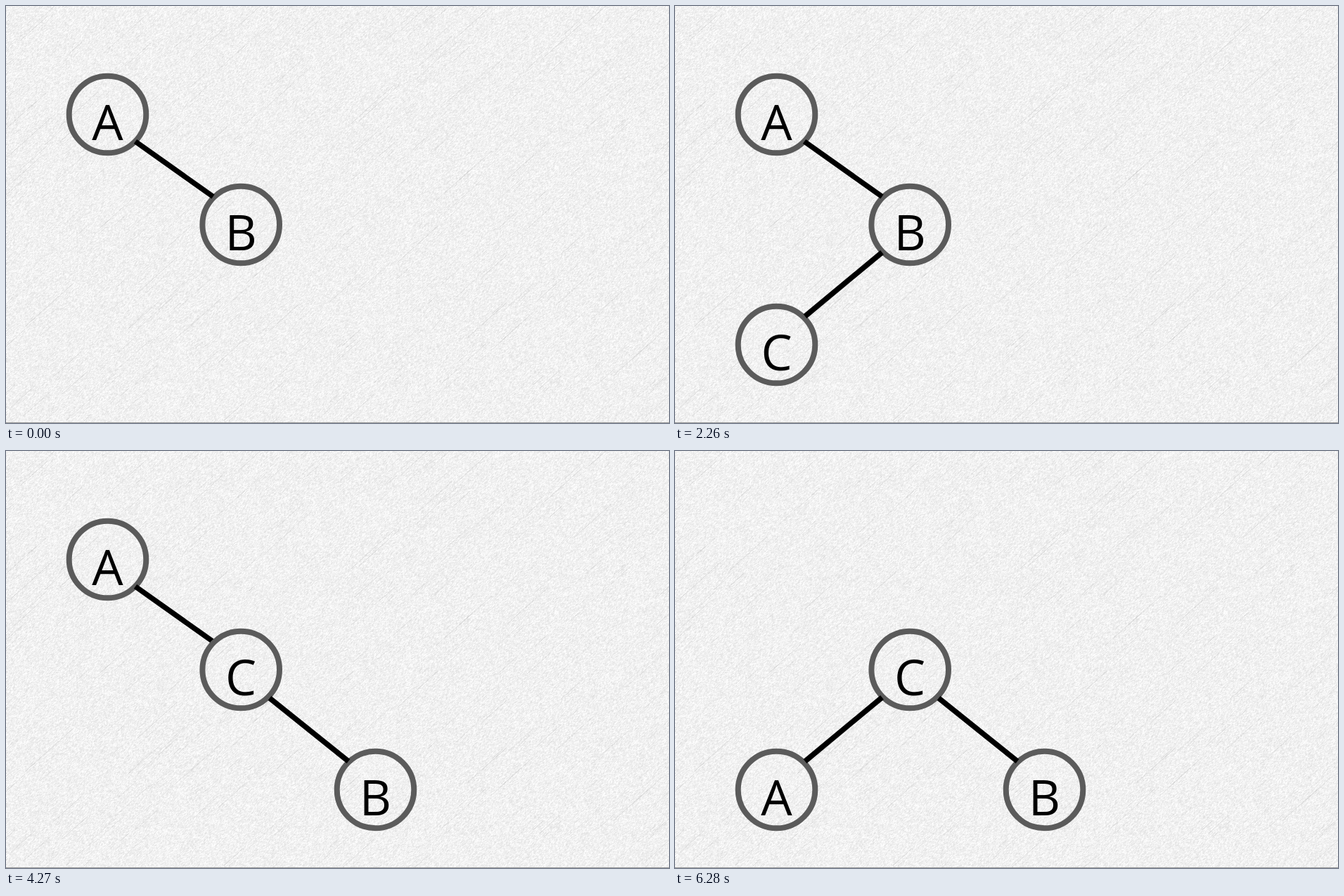
These frames come from a looping animation (943 px wide and 594 px high, 7.18 s). An HTML page with a canvas:

```html
<!DOCTYPE html>
<html lang="en">
<head>
<meta charset="utf-8">
<title>Tree rotation</title>
<style>
  html, body { margin: 0; width: 100%; height: 100%; overflow: hidden; background: #f0f0f0; }
  canvas, svg { position: absolute; left: 0; top: 0; display: block; }
  circle { fill: none; stroke: #5b5b5b; stroke-width: 8; }
  line { stroke: #000; stroke-width: 7.5; }
  text { font: 70px "Open Sans", "Noto Sans", sans-serif; text-anchor: middle; }
</style>
</head>
<body>
<canvas id="paper" width="943" height="594"></canvas>
<svg id="tree" width="943" height="594"></svg>
<script>
const W = 943, H = 594, LOOP = 7180;

let seed = 7;
function random() {
  seed = (seed * 1664525 + 1013904223) >>> 0;
  return seed / 4294967296;
}

// Grainy paper, smeared a little along the rising diagonal, with faint scratches.
function drawPaper() {
  const ctx = document.getElementById('paper').getContext('2d');
  const image = ctx.createImageData(W, H);
  const noise = Float32Array.from({ length: W * H }, random);
  for (let y = 0; y < H; y++) {
    for (let x = 0; x < W; x++) {
      const i = y * W + x;
      const below = y < H - 1 && x > 0 ? noise[i + W - 1] : noise[i];
      const left = x > 0 ? noise[i - 1] : noise[i];
      const grain = noise[i] * 0.45 + below * 0.35 + left * 0.2;
      image.data.fill(Math.min(253, 241 + (grain - 0.5) * 38), i * 4, i * 4 + 3);
      image.data[i * 4 + 3] = 255;
    }
  }
  ctx.putImageData(image, 0, 0);

  for (let n = 0; n < 520; n++) {
    const x = random() * (W + 60) - 60, y = random() * (H + 60);
    const length = 10 + 60 * random() ** 2;
    ctx.strokeStyle = `rgba(110,110,110,${0.04 + 0.14 * random()})`;
    ctx.beginPath();
    ctx.moveTo(x, y);
    ctx.lineTo(x + length, y - length * 0.9);
    ctx.stroke();
  }
  ctx.fillStyle = '#999';
  ctx.fillRect(0, H - 1, W, 1);
}

const node = (letter, x, y) =>
  `<circle cx="${x}" cy="${y}" r="54.8"/><text x="${x}" y="${y + 36}">${letter}</text>`;
const edge = (x1, y1, x2, y2) =>
  `<line x1="${x1}" y1="${y1}" x2="${x2}" y2="${y2}"/>`;

const TOP = [144.5, 154.5], MIDDLE = [334.2, 311.5], LEFT = [144.5, 482.5], RIGHT = [525.5, 482.5];
const leftEdge = edge(185, 442, 294.5, 351);

function addGroup(markup) {
  const group = document.createElementNS('http://www.w3.org/2000/svg', 'g');
  group.innerHTML = markup;
  return document.getElementById('tree').appendChild(group);
}

const middleB = addGroup(node('B', ...MIDDLE));
const leftC = addGroup(node('C', ...LEFT) + leftEdge);
const topA = addGroup(node('A', ...TOP) + edge(184, 193, 294.5, 271.5));
const rotated = addGroup(node('C', ...MIDDLE) + node('B', ...RIGHT) + edge(375, 352, 487, 442));
const leftA = addGroup(node('A', ...LEFT) + leftEdge);

// Fades advance every 120 ms; the step before `late` lasts 20 ms longer.
function fade(t, start, late, first, perStep) {
  const elapsed = t - start;
  if (elapsed < 0) return 0;
  const step = elapsed < late * 120 + 20
    ? Math.min(Math.floor(elapsed / 120), late - 1)
    : Math.floor((elapsed - 20) / 120);
  return Math.min(1, first + step * perStep);
}

function render(now) {
  const t = now % LOOP;
  const insertC = fade(t, 1520, 1, 0.19, 0.135);
  const rotate = fade(t, 3410, 6, 0.09, 0.13);
  const moveA = fade(t, 5420, 3, 0.09, 0.13);
  middleB.style.opacity = 1 - rotate;
  leftC.style.opacity = insertC * (1 - rotate);
  topA.style.opacity = 1 - moveA;
  rotated.style.opacity = rotate;
  leftA.style.opacity = moveA;
}

drawPaper();
const begin = performance.now();
function tick() {
  render(performance.now() - begin);
  requestAnimationFrame(tick);
}
tick();
</script>
</body>
</html>
```
